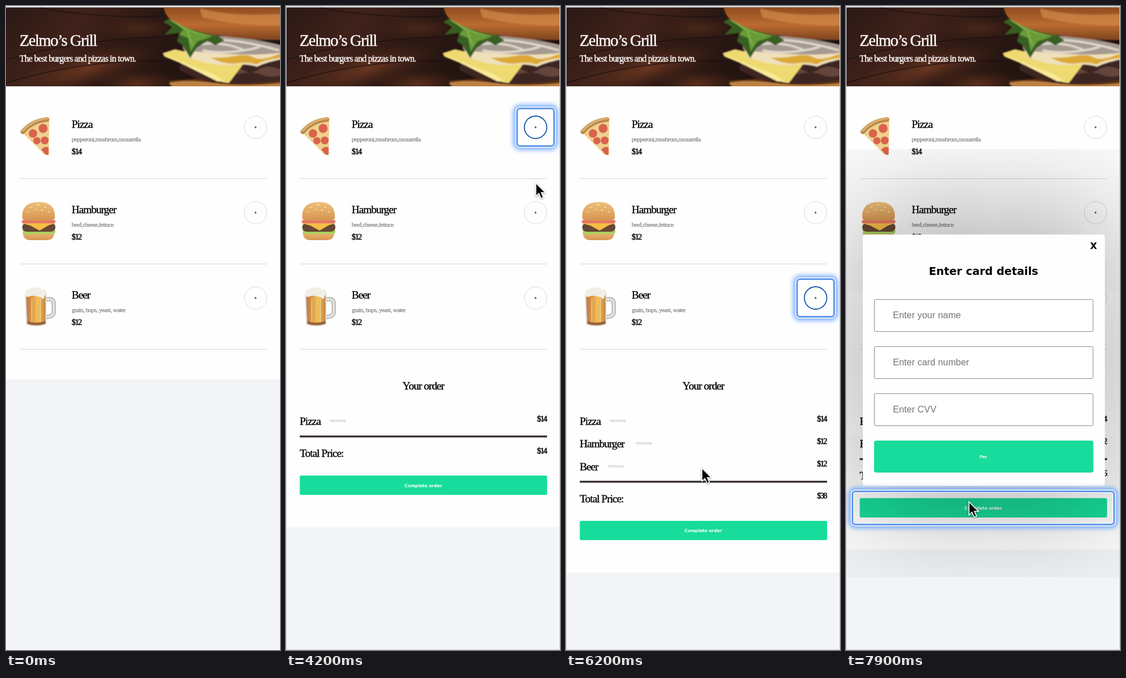
Recreate the animation shown at these times as an HTML page. Size 488 by 1147 pixels, loop 8 s.

```html
<!DOCTYPE html>
<html lang="en">
<head>
<meta charset="utf-8">
<title>Restaurant menu</title>
<style>
  html, body { margin: 0; width: 100%; height: 100%; overflow: hidden; background: #f3f4f6; }
  #stage { position: relative; width: 488px; height: 1147px; overflow: hidden; }
  #stage > * { position: absolute; left: 0; top: 0; }
  svg { display: block; }
  .serif { font-family: "Liberation Serif", serif; letter-spacing: -.05em; fill: #050505; stroke: #050505; stroke-width: .4px; }
  .name { font-size: 19.4px; }
  .price { font-size: 14.5px; letter-spacing: -.11em; stroke-width: .5px; }
  .note { font-size: 11.3px; fill: #858585; stroke: #858585; stroke-width: .25px; }
  .light { fill: #fff; stroke: #fff; }
  .ui { font-family: "DejaVu Sans", sans-serif; }
  .bold { font-weight: bold; }
  .end { text-anchor: end; }
  .mid { text-anchor: middle; }
  .field { font: 16.4px "Liberation Sans", sans-serif; fill: #757575; }
  #shade { left: 30px; top: 407px; width: 431px; height: 448px; border-radius: 4px;
    background: #fefefe; box-shadow: 0 0 300px rgba(0, 0, 0, .5); }
  #ring { box-sizing: border-box; border: 3px solid #5f98ee; border-radius: 7px;
    box-shadow: inset 0 0 0 1px #fff, 0 0 0 1.5px #fff, 0 0 9px 5px #74a9fb; }
  #frame { box-sizing: border-box; width: 488px; height: 1147px; border: 1px solid #cdced1; }
</style>
</head>
<body>
<div id="stage">
  <svg id="page" width="488" height="1147" viewBox="0 0 488 1147">
    <defs>
      <linearGradient id="wood" x1="0" y1="0" x2="1" y2=".25">
        <stop offset="0" stop-color="#2b1915"/><stop offset=".3" stop-color="#40221a"/>
        <stop offset=".55" stop-color="#2b1813"/><stop offset="1" stop-color="#1d110e"/>
      </linearGradient>
      <radialGradient id="glow">
        <stop offset="0" stop-color="#7d4023" stop-opacity=".75"/><stop offset="1" stop-color="#5a2c1c" stop-opacity="0"/>
      </radialGradient>
      <linearGradient id="bun" x1="0" y1="0" x2="0" y2="1">
        <stop offset="0" stop-color="#8d4a20"/><stop offset=".55" stop-color="#bb6c30"/><stop offset="1" stop-color="#7c421f"/>
      </linearGradient>
      <linearGradient id="roll" x1="0" y1="0" x2="0" y2="1">
        <stop offset="0" stop-color="#eec07c"/><stop offset="1" stop-color="#d5934f"/>
      </linearGradient>
      <linearGradient id="ale">
        <stop offset="0" stop-color="#b9783f"/><stop offset=".25" stop-color="#d6914a"/>
        <stop offset=".6" stop-color="#f2c25a"/><stop offset="1" stop-color="#c58743"/>
      </linearGradient>
      <clipPath id="banner"><path d="M0 2.5H488V143H0z"/></clipPath>
      <filter id="soft"><feGaussianBlur stdDeviation="1.2"/></filter>
    </defs>
    <path fill="#e9f3f4" d="M0 0H488V3H0z"/>
    <path id="sheet" fill="#fefefe"/>

    <g clip-path="url(#banner)">
      <path fill="url(#wood)" d="M0 2H488V143H0z"/>
      <ellipse cx="145" cy="112" rx="135" ry="34" fill="url(#glow)" transform="rotate(-14 145 112)"/>
      <ellipse cx="240" cy="40" rx="70" ry="22" fill="url(#glow)" opacity=".5"/>
      <ellipse cx="235" cy="138" rx="80" ry="26" fill="url(#glow)" opacity=".8"/>
      <g fill="none" stroke="#190e0c" stroke-width="2" opacity=".6">
        <path d="M0 96Q130 58 290 55M0 137Q150 92 290 99M60 3Q170 24 290 17"/>
      </g>
      <g filter="url(#soft)">
        <path fill="#5d3018" d="M290 133Q390 123 492 131V150H300z"/>
        <path fill="#bd8143" d="M290 137Q320 130 370 137T492 137V150H300z"/>
        <path fill="#3e2722" d="M312 100Q400 92 492 98V132Q410 143 370 136Q325 126 308 113z"/>
        <path fill="#65443a" d="M400 115q12-8 24 0t26-2 42 1v8q-20 8-38 0t-54 2z"/>
        <path fill="#efd971" d="M279 84L301 77L422 104L397 137Q381 137 370 126L282 90z"/>
        <path fill="#fae99a" d="M282 87L373 123L390 135L376 134z"/>
        <path fill="#eee0ba" d="M317 78Q360 84 412 82T492 80V95Q465 99 447 108Q428 102 400 105T325 92z"/>
        <path fill="#dda834" d="M365 92q22 1 42-3t35 3 50-9v9q-30 3-46 12-14-5-35-2t-46-10z"/>
        <path fill="#a69a90" d="M316 58Q390 45 492 70V83Q420 92 315 77z"/>
        <path fill="none" stroke="#ded5cb" stroke-width="4" d="M324 74Q372 57 425 79M343 61Q402 55 486 79M350 79Q396 88 452 73"/>
        <path fill="#395f22" d="M280 29l14-9 23 6 52 22 20 13-16 9-14-8-20 13-11 18-12-21-12-10 6-14-27 3 13-14z"/>
        <path fill="#679b38" d="M294 24l20 10 25 12 25 10-23 7-12 18-5-24-16-6 8-9z"/>
        <path fill="none" stroke="#8cb653" stroke-width="1.8" d="M294 25l28 18 10 26M322 43l44 11"/>
        <path fill="url(#bun)" d="M281 0Q282 19 300 28Q325 43 368 51Q430 61 492 61V0z"/>
        <path fill="#d38a49" opacity=".7" d="M345 4Q400 20 492 14V34Q415 37 350 20z"/>
      </g>
    </g>
    <text class="serif light" x="24" y="71" font-size="28.8">Zelmo’s Grill</text>
    <text class="serif light" x="24" y="99" font-size="16.2">The best burgers and pizzas in town.</text>

    <g id="pizza">
      <path fill="#efd08c" d="M30 226Q50 209 77 204L76 266Q71 267 66 262z"/>
      <path fill="#d9a45a" d="M66 261l9 5 1-13z" opacity=".5"/>
      <g fill="#d9634c"><circle cx="66" cy="218" r="8"/><circle cx="48" cy="227" r="7.5"/>
        <circle cx="55" cy="240" r="6.5"/><circle cx="69" cy="239.500" r="7"/><path d="M63 256q5-7 13-4v12q-4 2-7-1z"/></g>
      <path fill="none" stroke="#b9854a" stroke-width="8" stroke-linecap="round" d="M30 224Q46 205 73 202"/>
      <path fill="none" stroke="#d9ad6c" stroke-width="4" stroke-linecap="round" d="M30 222Q46 204 73 200"/>
    </g>
    <g id="burger">
      <path fill="url(#roll)" d="M30 401H86Q87 417 72 417H44Q29 417 30 401z"/>
      <path fill="#a4d35c" d="M28 400q6-6 12-2t12 0 12 0 12 0 12 2q1 5-5 6-5-3-9 1-6-4-11 0-6-4-11 0-6-4-11 0-10 0-11-7z"/>
      <path fill="#654735" d="M29 394Q29 387 37 387H80Q88 387 88 394T80 402H37Q29 401 29 394z"/>
      <path fill="#f5bd46" d="M29 387H87L75 391 60 400 43 391z"/>
      <rect x="28" y="381" width="60" height="6" rx="3" fill="#e77568"/>
      <path fill="url(#roll)" d="M29 378Q27 349 58 349T87 378Q86 383 58 383T29 378z"/>
      <path fill="none" stroke="#fae2b2" stroke-width="1.8" stroke-linecap="round" d="M44 359l2-1M56 354h2M69 358l2 1M52 363l2-1M63 364h2M76 366l1 1M38 367l1-1"/>
    </g>
    <g id="beer">
      <path fill="none" stroke="#aaa8a4" stroke-width="7" d="M70 522H77Q85 522 85 530V546Q84 554 70 554"/>
      <path fill="none" stroke="#e6e4df" stroke-width="4" d="M70 522H77Q85 522 85 530V546Q84 554 70 554"/>
      <path fill="#d8d2c9" d="M34 511H72V567Q53 574 36 567z"/>
      <path fill="url(#ale)" d="M36 513H70V563Q53 568 38 563z"/>
      <path fill="none" stroke="#fae2a0" stroke-width="2" opacity=".55" d="M46 522V564M61 522V564"/>
      <path fill="#9c6336" d="M38 561Q53 567 70 561V566Q53 571 38 566z"/>
      <path fill="#f1eee7" d="M34 515Q32 506 42 504Q53 498 64 504Q74 504 73 514Q68 514 68 520Q65 524 62 519Q50 514 43 517Q36 520 34 515z"/>
    </g>
    <g id="menu"></g>
    <g id="order"></g>
  </svg>

  <div id="shade"></div>
  <svg id="form" width="488" height="1147">
    <text class="ui bold mid" x="441" y="433" font-size="16">X</text>
    <text class="ui bold mid" x="245" y="479" font-size="19.4">Enter card details</text>
    <g id="fields"></g>
    <rect x="50" y="774" width="390.500" height="57" rx="4" fill="#18dc9b"/>
    <text class="ui bold mid" x="244.500" y="805" font-size="6.6" fill="#fff">Pay</text>
  </svg>
  <div id="ring"></div>
  <div id="frame"></div>
  <svg id="cursor" width="30" height="38" viewBox="-3 -3 30 38" style="filter:drop-shadow(0 1px 1.5px #0006)">
    <path d="M0 0V23.500L5.400 18.500 9.300 27.500 13.500 25.700 9.700 17H17z" stroke="#fff" stroke-width="1.6"/>
  </svg>
</div>
<script>
const $ = id => document.getElementById(id);
const text = (cls, x, y, s, extra = '') => `<text class="${cls}" x="${x}" y="${y}" ${extra}>${s}</text>`;

const items = [
  { name: 'Pizza', note: 'pepperoni,mushrom,mozarella', price: 14, gap: 78 },
  { name: 'Hamburger', note: 'beef,cheese,lettuce', price: 12, gap: 124 },
  { name: 'Beer', note: 'grain, hops, yeast, water', price: 12, gap: 74 }
];

$('menu').innerHTML = items.map((it, i) => {
  const y = i * 152;
  return text('serif name', 117, 217 + y, it.name)
    + text('serif note', 117, 241 + y, it.note)
    + text('serif price', 117, 264 + y, '$' + it.price)
    + `<path stroke="#d7d7d7" d="M24.500 ${307.5 + y}H465"/>`
    + `<circle class="add" cx="444.500" cy="${216 + y}" r="20"/>`
    + text('ui bold mid', 444.5, 218.1 + y, '+', 'font-size="6.5"');
}).join('');
const adds = document.querySelectorAll('.add');

$('fields').innerHTML = ['Enter your name', 'Enter card number', 'Enter CVV'].map((s, i) => {
  const y = i * 83.8;
  return `<rect x="50.500" y="${522.8 + y}" width="389.500" height="57" rx="2" fill="#fff" stroke="#858585"/>`
    + text('field', 83.5, 556.3 + y, s);
}).join('');

function drawOrder(list) {
  const d = (list.length - 1) * 40.3;
  $('sheet').setAttribute('d', `M0 143H488V${list.length ? 928.5 + d : 665}H0z`);
  if (!list.length) return $('order').innerHTML = '';
  const total = list.reduce((sum, i) => sum + items[i].price, 0);
  $('order').innerHTML = text('serif name mid', 244.5, 682.5, 'Your order')
    + list.map((n, i) => {
      const y = i * 40.3, it = items[n];
      return text('serif name', 24.5, 746 + y, it.name)
        + text('ui', it.gap, 741 + y, 'remove', 'font-size="7.6" fill="#b3b3b3"')
        + text('serif price end', 464, 739.5 + y, '$' + it.price);
    }).join('')
    + `<rect x="24.500" y="${765 + d}" width="440.500" height="3.400" fill="#393035"/>`
    + text('serif name', 24.5, 803 + d, 'Total Price:')
    + text('serif price end', 464, 796.5 + d, '$' + total)
    + `<rect x="24.500" y="${836.3 + d}" width="440.500" height="34.400" rx="2.500" fill="#18dc9b"/>`
    + text('ui bold mid', 244.5, 856.8 + d, 'Complete order', 'font-size="7.64" fill="#fff"');
}

// Each list holds [start time, state]; the latest started entry applies.
const orders = [[0, []], [3800, [0]], [5000, [0, 1]], [5650, [0, 1, 2]], [6800, [0, 2]]];
const presses = [[0, -1], [3650, 0], [3800, -1], [4800, 1], [5000, -1], [5500, 2], [5650, -1]];
const rings = [
  [0, null],
  [3650, [410, 181, 69, 70]],
  [4800, [410, 333, 69, 70]],
  [5500, [410, 485, 69, 70]],
  [6650, [104, 751, 69, 56, '#fefefe']],
  [7100, null],
  [7500, [10, 863, 469, 62]]
];
const path = [
  [1800, 490, 262], [2500, 442, 215], [3700, 442, 215], [4450, 446, 350], [5050, 446, 350],
  [5450, 445, 507], [5650, 445, 507], [6200, 242, 823], [6600, 131, 767], [6950, 131, 767], [7450, 219, 883]
];
const at = (list, t) => list.filter(e => e[0] <= t).pop()[1];

function pointer(t) {
  const i = path.findIndex(k => k[0] > t);
  if (i < 0) return path[path.length - 1].slice(1);
  const [t0, x0, y0] = path[Math.max(i - 1, 0)], [t1, x1, y1] = path[i];
  const p = Math.max(0, (t - t0) / (t1 - t0)), e = p * p * (3 - 2 * p);
  return [x0 + (x1 - x0) * e, y0 + (y1 - y0) * e];
}
const show = (id, on) => $(id).style.visibility = on ? 'visible' : 'hidden';

let shown;
function render(t) {
  const list = at(orders, t), press = at(presses, t), ring = at(rings, t);
  if (list !== shown) drawOrder(shown = list);
  adds.forEach((c, i) => {
    const focus = ring && ring[1] === 181 + i * 152;
    c.setAttribute('fill', press === i ? '#fcd14f' : '#fefefe');
    c.setAttribute('stroke', focus ? '#1659a8' : '#d9d9d9');
    c.setAttribute('stroke-width', focus ? 1.8 : 1);
  });
  show('ring', ring);
  if (ring) {
    const [x, y, w, h, fill = 'transparent'] = ring;
    Object.assign($('ring').style, { left: x + 'px', top: y + 'px', width: w + 'px', height: h + 'px', background: fill });
  }
  show('frame', t >= 1500);
  show('shade', t >= 7600);
  show('form', t >= 7600);
  show('cursor', t >= path[0][0]);
  const [x, y] = pointer(t);
  $('cursor').style.transform = `translate(${x - 3}px, ${y - 3}px)`;
}

const start = performance.now();
function tick() {
  render((performance.now() - start) % 8000);
  requestAnimationFrame(tick);
}
tick();
</script>
</body>
</html>
```
